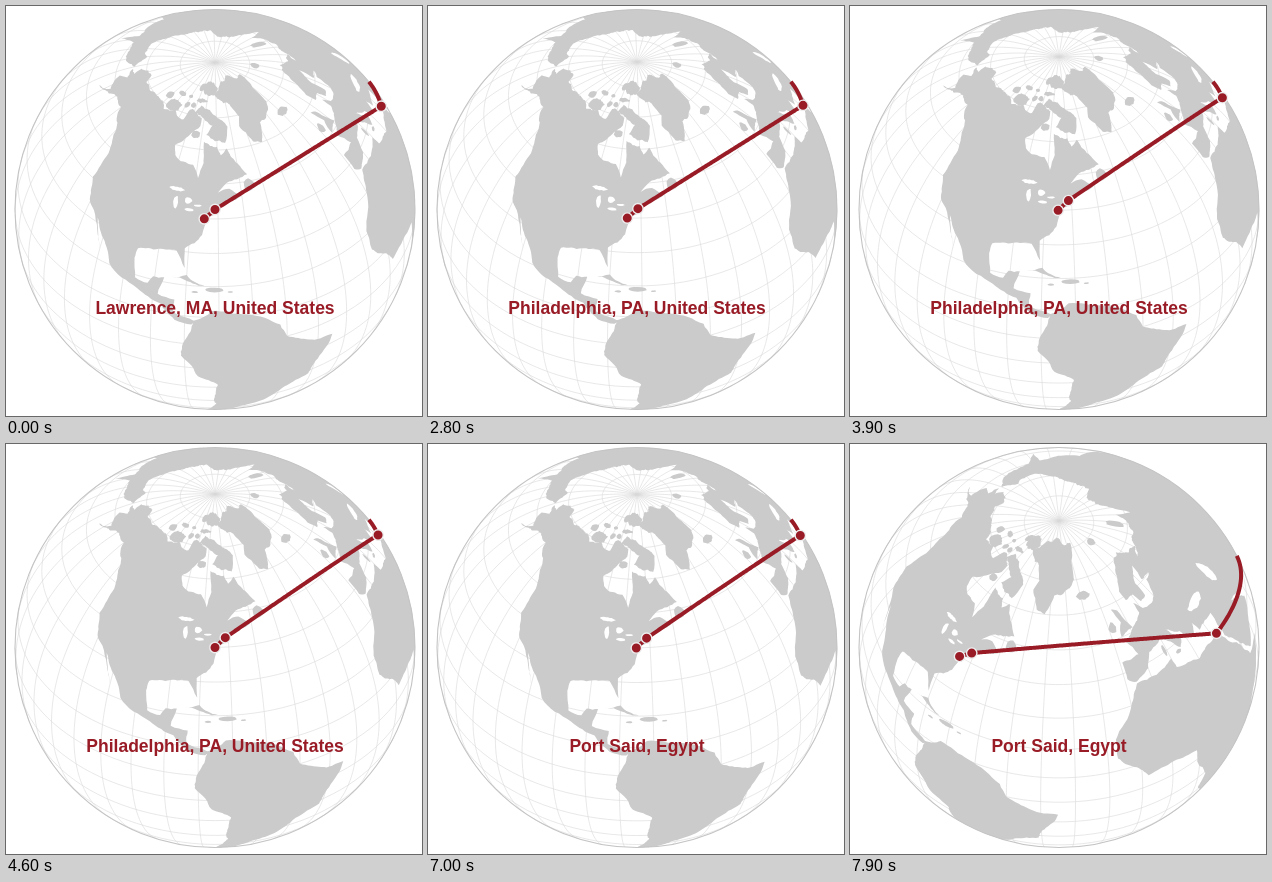
An HTML page with a canvas that plays this animation: 416 by 410 pixels, repeating every 8 s.

```html
<!DOCTYPE html>
<html lang="en">
<head>
<meta charset="utf-8">
<title>Globe route</title>
<style>
  html, body { margin: 0; width: 100%; height: 100%; overflow: hidden; background: #fff; }
  canvas, svg { position: absolute; left: 0; top: 0; width: 416px; height: 410px; }
  text { font: bold 17.5px "Liberation Sans", Arial, sans-serif; fill: #981b26; text-anchor: middle; }
</style>
</head>
<body>
<canvas id="globe"></canvas>
<svg viewBox="0 0 416 410"><text id="label" x="209" y="308"></text></svg>
<script>
const W = 416, H = 410, CX = 209, CY = 203.5, R = 200;
const LOOP = 8000, STEP = 100, TRAVEL = 2500;
const RAD = Math.PI / 180;
const RED = '#981b26', GREY = '#cbcbcb';

// Capes and bays as longitude, latitude; the coast between them is roughened by rule.
const coasts = {
  northAmerica: [-124.5,48.4, -124.3,40.3, -120.6,34.5, -117,32.5, -110,23, -114.5,31.3, -109,26, -105.5,20.5,
    -95,16, -87.5,13, -83,8.3, -78,7.3, -77,8.5, -83.5,10.8, -83.3,15, -88.5,15.9, -87,21.4, -90.5,21, -92,18.6,
    -96.2,19.2, -97.5,25, -97,28, -90,29.5, -84,30, -80.8,25.2, -81.3,31, -75.7,35.3, -74,40.5, -70,41.8,
    -70,43.8, -65,45, -60.5,46, -65,48.5, -70,47.5, -66,50.2, -56,52, -64.5,60.3, -68,58.4, -70,61, -78,62.4,
    -77,56, -79,51.5, -82.2,55.2, -92.5,57, -94.5,60, -87,64.5, -82,67, -82,69.6, -94.5,71.5, -96,68,
    -115,68.3, -128,70.3, -141,69.6, -156.6,71.3, -166,68.4, -162,66.2, -168,65.6, -161,64, -165.5,61.5,
    -157.5,58.5, -164.5,54.6, -151.5,59.5, -140,59.8, -130.5,55],
  southAmerica: [-77.4,8.6, -72,12.2, -62,10.5, -52,4.9, -50,0, -35,-6, -39,-15, -41,-22, -48.5,-26, -54,-34.5,
    -62,-39, -69,-52, -75,-48, -70.3,-18.5, -76.2,-14, -81,-5, -80,1],
  africa: [-6,35.8, 10,37.2, 10.5,34, 20,31, 33,31, 43,12, 51,11.8, 40,-4, 40,-15, 33,-27, 27,-33.8, 18.5,-34,
    12,-17, 13.5,-11, 9,-1, 9,4, -8,4.5, -17,14.5, -17,21, -10,30],
  eurasia: [-6,36.3, -9,38, -9,43.2, -1.5,43.5, -4.5,48.3, 8,53.8, 8.2,57, 11,54.2, 20,54.6, 24,59.3, 30,60,
    22,60.5, 25,65, 17,61, 16.5,56.5, 12.5,56, 11,59, 5.5,58.8, 5,62, 14,68, 26,71, 41,67, 34,65, 44,68, 70,73,
    73,68, 80,73.5, 104,77.5, 113,73.7, 140,72.7, 180,69, 190,66, 163,60, 157,51, 156,59, 135,54.7, 128,38,
    122,31, 108,20, 100,8, 91,22, 78,8, 72,21, 57,26, 48,30, 57,22, 45,13, 35,28, 36,36.7, 27,37, 26,40.5,
    23,37, 14,45.3, 18,40, 15.8,38, 10,44, 3,42.5, 0,38.5],
  greenland: [-73,78.2, -60,82, -33,83.5, -12,81.5, -20,76, -22,70.2, -38,65.7, -43,60, -48,61, -53.5,66.5,
    -51,69.5, -56,74, -68,76.2],
  baffin: [-65,62, -77,64.5, -73,67.5, -89,71, -85,73.7, -76,72.5, -62,67],
  britain: [-5.5,50.1, 1.3,51.2, 0,53.2, -2,57.5, -5,58.5, -3,54, -5,52],
  cuba: [-84.8,22, -80,23.1, -74.3,20.2, -78,20.7]
};

let seed = 7;
const random = () => (seed = seed * 16807 % 2147483647) / 2147483647;
const range = (n, f) => Array.from({ length: n + 1 }, (_, i) => f(i));

const vec = (lon, lat) => [
  Math.cos(lat * RAD) * Math.cos(lon * RAD),
  Math.cos(lat * RAD) * Math.sin(lon * RAD),
  Math.sin(lat * RAD)
];

function slerp(a, b, t) {
  const d = Math.acos(a[0] * b[0] + a[1] * b[1] + a[2] * b[2]);
  const p = Math.sin((1 - t) * d) / Math.sin(d), q = Math.sin(t * d) / Math.sin(d);
  return a.map((v, i) => p * v + q * b[i]);
}

// Halves an edge again and again, nudging each midpoint sideways.
function roughen([x1, y1], [x2, y2], rough) {
  const dx = x2 - x1, dy = y2 - y1;
  if (Math.hypot(dx, dy) < 1.5) return [vec(x1, y1)];
  const nudge = (random() - .5) * rough;
  const mid = [(x1 + x2) / 2 - dy * nudge, (y1 + y2) / 2 + dx * nudge];
  return [...roughen([x1, y1], mid, rough), ...roughen(mid, [x2, y2], rough)];
}

const coastline = (points, rough = .16) =>
  points.flatMap((p, i) => roughen(p, points[(i + 1) % points.length], rough));

const pairs = flat => range(flat.length / 2 - 1, i => flat.slice(i * 2, i * 2 + 2));

// A ragged oval, with half width and half height in degrees.
const oval = (lon, lat, w, h) => coastline(range(11, i => {
  const a = i * 30 * RAD, r = .85 + random() * .3;
  return [lon + w * r * Math.cos(a), lat + h * r * Math.sin(a)];
}));

const arctic = [
  oval(-110, 71, 7, 2), oval(-121, 73, 4, 1.2), oval(-79, 79.8, 11, 2.8), oval(-91, 79.7, 4, 1.4),
  oval(-86, 75.3, 6, .7), oval(-111, 75.5, 5, .7), oval(-93, 73.2, 2.4, .9), oval(-99, 72.8, 2.5, 1),
  oval(-100, 75.7, 2.5, .6), oval(-84, 64.4, 3, 1.1), oval(18, 78.5, 6, 1.3), oval(58, 73.7, 4, 2.8)
];
const islands = [
  oval(-56, 49, 2.4, 1.6), oval(-71.3, 19, 2.7, .7), oval(-77.3, 18.1, 1, .3), oval(-66.5, 18.2, .8, .25),
  oval(-18.5, 65, 4.6, 1.2), oval(-8, 53.4, 1.9, 1.6), oval(9, 40.5, .6, 1.8), oval(14.2, 37.5, 1.3, .6)
];
const lakes = [
  oval(-87.5, 47.6, 3.2, .6), oval(-87, 43.8, .9, 1.9), oval(-82, 44.8, 1.5, 1), oval(-81.2, 42.2, 1.8, .4),
  oval(-78, 43.6, 1.5, .3), oval(34, 43.3, 6, 1.6), oval(51, 42, 2.3, 4.5)
];
const land = [...Object.values(coasts).map(flat => coastline(pairs(flat))), ...arctic, ...islands];

const graticule = [
  ...range(35, i => range(85, k => vec(i * 10, -80 + k * 2))),
  ...range(16, i => range(120, k => vec(k * 3, -80 + i * 10)))
];

const lawrence = vec(-71.16, 42.7), philadelphia = vec(-75.17, 39.95);
const portSaid = vec(32.3, 31.26), singapore = vec(103.8, 1.35);
const stops = [philadelphia, lawrence, portSaid, singapore];
const routes = stops.slice(1).map((to, i) => range(200, k => slerp(stops[i], to, k / 200)));

const trips = [
  { start: 2100, from: lawrence, to: philadelphia, label: 'Philadelphia, PA, United States' },
  { start: 6775, from: philadelphia, to: portSaid, label: 'Port Said, Egypt' }
];

const canvas = document.getElementById('globe');
const label = document.getElementById('label');
const ctx = canvas.getContext('2d');
const scale = window.devicePixelRatio || 1;
canvas.width = W * scale;
canvas.height = H * scale;
ctx.scale(scale, scale);
ctx.lineJoin = 'round';

const ease = t => t < .5 ? 4 * t ** 3 : 1 - 4 * (1 - t) ** 3;

function projector(c) {
  const cosLat = Math.hypot(c[0], c[1]), sinLat = c[2];
  const cosLon = c[0] / cosLat, sinLon = c[1] / cosLat;
  return p => {
    const out = p[0] * cosLon + p[1] * sinLon;
    return {
      x: p[1] * cosLon - p[0] * sinLon,
      y: p[2] * cosLat - out * sinLat,
      z: p[2] * sinLat + out * cosLat
    };
  };
}

// Hidden points slide out to the rim.
function fillAll(shapes, project, color) {
  ctx.fillStyle = color;
  for (const points of shapes) {
    ctx.beginPath();
    for (const p of points) {
      const { x, y, z } = project(p);
      const k = z < 0 ? R / Math.hypot(x, y) : R;
      ctx.lineTo(CX + x * k, CY - y * k);
    }
    ctx.fill();
  }
}

function strokeAll(lines, project, color, width) {
  ctx.strokeStyle = color;
  ctx.lineWidth = width;
  ctx.beginPath();
  for (const points of lines) {
    let down = false;
    for (const p of points) {
      const { x, y, z } = project(p);
      if (z >= 0) ctx[down ? 'lineTo' : 'moveTo'](CX + x * R, CY - y * R);
      down = z >= 0;
    }
  }
  ctx.stroke();
}

function disc(x, y, r) {
  ctx.beginPath();
  ctx.arc(x, y, r, 0, 2 * Math.PI);
}

function draw(time) {
  let center = lawrence, text = 'Lawrence, MA, United States';
  for (const trip of trips) {
    if (time < trip.start) break;
    center = slerp(trip.from, trip.to, ease(Math.min(1, (time - trip.start) / TRAVEL)));
    text = trip.label;
  }
  const project = projector(center);

  ctx.clearRect(0, 0, W, H);
  strokeAll(graticule, project, '#d8d8d8', .6);
  fillAll(land, project, GREY);
  fillAll(lakes, project, '#fff');
  disc(CX, CY, R);
  ctx.strokeStyle = '#c4c4c4';
  ctx.lineWidth = 1.1;
  ctx.stroke();

  strokeAll(routes, project, RED, 4);
  ctx.fillStyle = RED;
  ctx.strokeStyle = '#eee';
  ctx.lineWidth = 1.4;
  for (const stop of stops) {
    const { x, y, z } = project(stop);
    if (z < 0) continue;
    disc(CX + x * R, CY - y * R, 5.2);
    ctx.fill();
    ctx.stroke();
  }
  if (label.textContent !== text) label.textContent = text;
}

const begin = performance.now();
function tick() {
  const time = (performance.now() - begin) % LOOP;
  draw(Math.floor(time / STEP) * STEP);
  requestAnimationFrame(tick);
}
tick();
</script>
</body>
</html>
```
